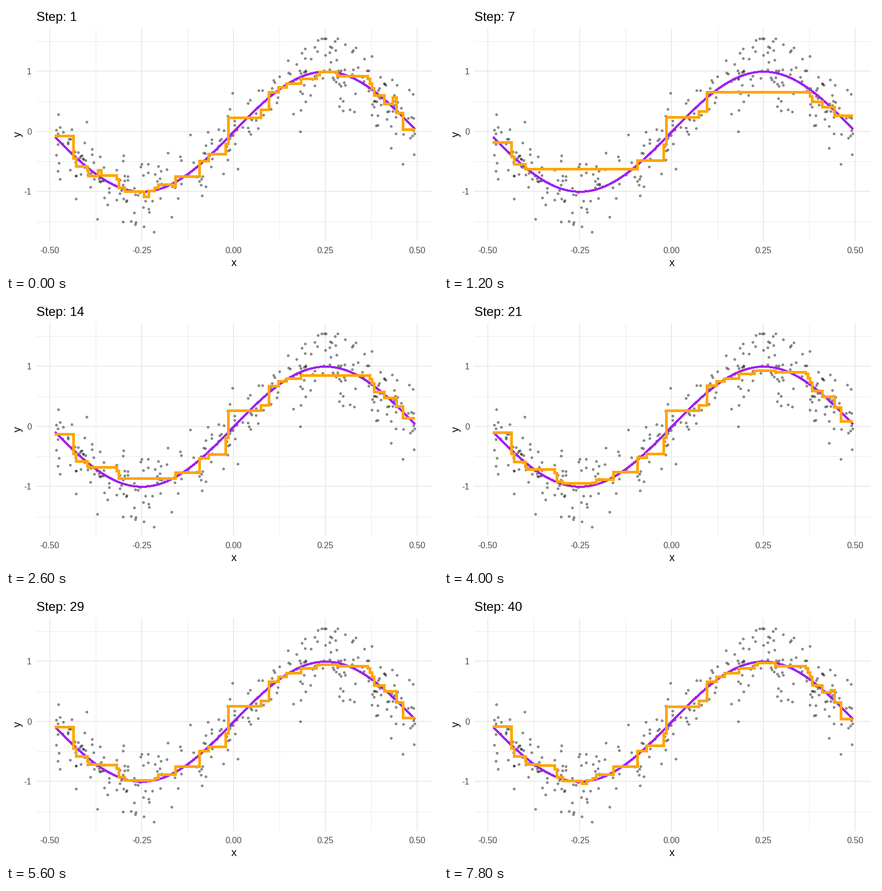
Recreate the animation shown at these times as a matplotlib script. Size 809 by 500 pixels, loop 8 s.

```python
import numpy as np
import matplotlib.pyplot as plt
from matplotlib.animation import FuncAnimation

W, H, DPI = 809, 500, 64
PT = 72 / DPI                      # points per pixel
X0, Y0, SX, SY = 426, 234.9, 688, 112.45
MID = 0.5                          # centre of a pixel
STEPS, RATE, DEPTH = 40, 0.25, 2

plt.rcParams["font.family"] = "Liberation Sans"


def px(x):
    return X0 + SX * x


def py(y):
    return Y0 - SY * y


def wave(x):
    return np.sin(2 * np.pi * x)


# Left edge and height of every step of the finished fit, in pixels
CELLS = np.array([
    (91, 242.5), (126, 284), (131, 299.5), (152, 306), (154, 317.5),
    (172, 306), (178, 316), (207, 323), (211, 339), (222, 346.5),
    (258, 356), (267, 345), (278, 339), (285, 333), (311, 337.5),
    (317, 318.5), (362, 289.5), (379, 276), (411, 257), (416, 208.5),
    (477, 193.5), (492, 160), (510, 151), (525, 144), (552, 135),
    (581, 128), (587, 122), (620, 130.5), (677, 135), (681, 144),
    (685, 153), (689, 166), (708, 182), (724, 170), (731, 199), (743, 230),
])
EDGES = np.append(CELLS[:, 0], 765)
WIDTHS = np.diff(EDGES)
GOAL = CELLS[:, 1] - Y0


def tree(res, width, depth):
    """Greedy regression tree: the leaf mean for each cell."""
    if depth == 0 or len(res) == 1:
        return np.full(len(res), np.average(res, weights=width))
    mass, area = np.cumsum(res * width), np.cumsum(width)
    gain = (mass[:-1] ** 2 / area[:-1]
            + (mass[-1] - mass[:-1]) ** 2 / (area[-1] - area[:-1]))
    cut = int(np.argmax(gain)) + 1
    return np.concatenate([tree(res[:cut], width[:cut], depth - 1),
                           tree(res[cut:], width[cut:], depth - 1)])


def boost():
    """Finished fit first, then the fit after 1, 2, 3... trees."""
    fits, fit = [GOAL], np.zeros_like(GOAL)
    for _ in range(STEPS - 1):
        fit = fit + RATE * tree(GOAL - fit, WIDTHS, DEPTH)
        fits.append(fit)
    return fits


def scatter_points():
    far = [(277, 422), (258, 412), (171, 398), (131, 360), (101, 323),
           (98, 202), (151, 216), (345, 240), (434, 304), (424, 162),
           (584, 63), (621, 60), (631, 195), (551, 234), (721, 265),
           (743, 295), (764, 277), (765, 238)]
    rng = np.random.default_rng(12)
    x = rng.uniform(-0.486, 0.493, 290)
    noise = np.clip(rng.normal(0, 0.28, x.size), -0.55, 0.55)
    near = np.column_stack([px(x), py(wave(x) + noise)])
    return np.vstack([far, near]) + MID


fig = plt.figure(figsize=(W / DPI, H / DPI), dpi=DPI, facecolor="white")
ax = fig.add_axes([0, 0, 1, 1])
ax.set_xlim(0, W)
ax.set_ylim(H, 0)
ax.axis("off")


def grid(xs, ys, width):
    style = dict(colors="#EBEBEB", linewidths=width * PT, zorder=1)
    ax.vlines(xs, 41, 440, **style)
    ax.hlines(ys, 57, 799, **style)


def label(x, y, text, size, color="black", **kw):
    return ax.text(x, y, text, fontsize=size * PT, color=color,
                   va=kw.pop("va", "baseline"), **kw)


def curve(x, y, color, width, **kw):
    return ax.plot(x, y, color=color, lw=width * PT, antialiased=False,
                   solid_capstyle="butt", **kw)[0]


ticks_x = np.linspace(-0.5, 0.5, 5)
ticks_y = np.array([-1, 0, 1])
grid(px(ticks_x[:-1] + 0.125), py(np.arange(-1.5, 2)), 1)
grid(px(ticks_x), py(ticks_y), 2)

for t in ticks_x:
    label(px(t), 463, f"{t:.2f}", 16, "#4D4D4D", ha="center")
for t in ticks_y:
    label(48, py(t) + 6, str(t), 16, "#4D4D4D", ha="right")
label(427, 487, "x", 20, ha="center")
label(22, 240, "y", 20, ha="center", va="center", rotation=90)
title = label(57, 28, "", 24)

ax.scatter(*scatter_points().T, s=(4 * PT) ** 2, facecolor=(0, 0, 0, 0.4),
           edgecolor=(0, 0, 0, 0.4), linewidth=PT, zorder=2)

xs = np.linspace(-0.486, 0.493, 300)
curve(px(xs) + MID, py(wave(xs)) + MID, "#A020F0", 3, zorder=3)
line = curve([], [], "#FFA500", 5, drawstyle="steps-post",
             solid_joinstyle="miter", zorder=4)
fits = boost()


def draw(frame):
    fit = fits[frame]
    title.set_text(f"Step: {frame + 1}")
    line.set_data(EDGES + MID, np.append(fit, fit[-1]) + Y0 + MID)
    return title, line


anim = FuncAnimation(fig, draw, frames=STEPS, interval=200, repeat=True,
                     repeat_delay=0, init_func=lambda: draw(0))
plt.show()
```
